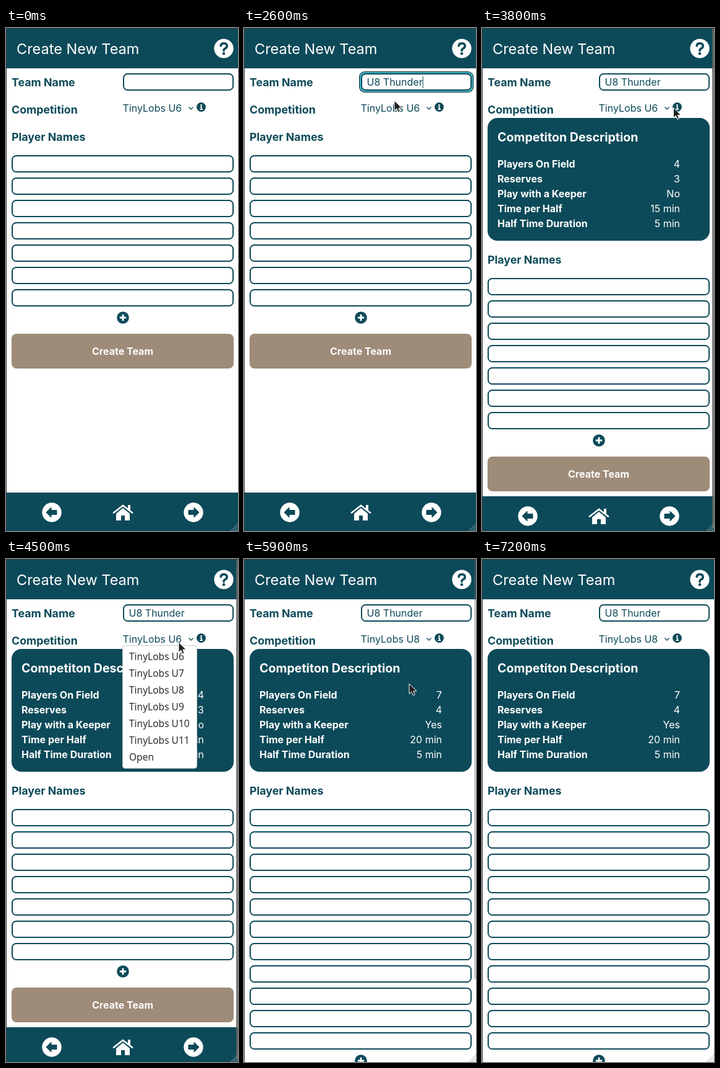
Animation, 375 px wide and 811 px high, one loop 8000 ms. Source, as an HTML page:

```html
<!DOCTYPE html>
<html lang="en">
<head>
<meta charset="utf-8">
<title>Create New Team</title>
<style>
  html, body { margin: 0; width: 100%; height: 100%; overflow: hidden; background: #fff; }
  svg { display: block; width: 375px; height: 811px; font: 16px Inter, sans-serif; fill: #0d4a59; }
  .bold { font-weight: 700; }
  .label { font-weight: 700; font-size: 17.8px; }
  .white { fill: #fff; }
  .field { fill: #fff; stroke: #0d4a59; stroke-width: 2; }
  .line { fill: none; stroke: #0d4a59; }
  .menu text { font: 15.5px "Noto Sans", sans-serif; fill: #2b2f33; }
</style>
</head>
<body>
<svg id="stage" viewBox="0 0 375 811"></svg>
<script>
const LOOP = 8000;
const STEP = 100;
const LEAGUE = "TinyLobs";
const OPTIONS = [6, 7, 8, 9, 10, 11].map(n => `${LEAGUE} U${n}`).concat("Open");
const FACTS = ["Players On Field", "Reserves", "Play with a Keeper", "Time per Half", "Half Time Duration"];
const VALUES = {
  U6: ["4", "3", "No", "15 min", "5 min"],
  U8: ["7", "4", "Yes", "20 min", "5 min"]
};

// Event times in ms
const FOCUS = 2000, TYPE = 2500, INFO = 3700, OPEN = 4500, CHOOSE = 5600;

// Pointer path: time, x, y
const PATH = [
  [1200, 2, 222], [1400, 112, 146], [1600, 196, 98], [1800, 230, 79], [1900, 230, 79],
  [2300, 240, 109], [2400, 240, 109], [2500, 243, 117], [2700, 243, 117],
  [3100, 304, 132], [3300, 316, 135], [3500, 317, 127], [3700, 317, 127],
  [4200, 279, 134], [4800, 279, 134], [5300, 267, 201], [5900, 267, 201], [6200, 378, 188]
];

// Scrollbar opacity from each time on
const SCROLL = [[0, 0], [INFO, .85], [5500, .75], [CHOOSE, .34], [6800, .28], [7000, .18], [7100, .08], [7200, 0]];

const text = (x, y, content, attrs = "") => `<text x="${x}" y="${y}" ${attrs}>${content}</text>`;
const rect = (x, y, w, h, r, attrs = "") => `<rect x="${x}" y="${y}" width="${w}" height="${h}" rx="${r}" ${attrs}/>`;
const circle = (x, y, r, attrs = "") => `<circle cx="${x}" cy="${y}" r="${r}" ${attrs}/>`;
const path = (d, attrs = "") => `<path d="${d}" ${attrs}/>`;
const group = (x, y, content, attrs = "") => `<g transform="translate(${x} ${y})" ${attrs}>${content}</g>`;
const range = n => [...Array(n).keys()];

function pointerAt(t) {
  const next = PATH.findIndex(key => key[0] >= t);
  if (t < PATH[0][0] || next < 0) return null;
  if (next === 0) return PATH[0].slice(1);
  const [t0, x0, y0] = PATH[next - 1], [t1, x1, y1] = PATH[next];
  const k = (t - t0) / (t1 - t0);
  return [x0 + (x1 - x0) * k, y0 + (y1 - y0) * k];
}

function header() {
  const hook = "M347.2 28.6Q347.6 24.8 352 24.8Q357.4 24.8 357.2 29Q357 31.6 354.2 33Q352 34.1 352 36.4";
  return rect(0, 0, 375, 65, 0) +
    text(17, 42, "Create New Team", 'class="white" font-size="23.5"') +
    circle(352, 33, 15.6, 'class="white"') +
    path(hook, 'class="line" stroke-width="3.6" stroke-linecap="round"') +
    circle(352, 41.2, 2.3);
}

function teamName(t) {
  const focused = t >= FOCUS && t < INFO;
  const value = t < TYPE ? "" : t < TYPE + STEP ? "U8 Th" : "U8 Thunder";
  const ring = rect(186, 70, 185, 34, 9, 'fill="#08272f"') + rect(187, 71, 183, 32, 8, 'fill="#44b5c4"');
  const caret = '<tspan dx="0.5" font-weight="300" id="caret"></tspan>';
  return text(9, 94, "Team Name", 'class="label"') +
    (focused ? ring : "") +
    rect(190, 74, 177, 26, 6.5, 'class="field"') +
    text(198.5, 93, value + (focused ? caret : ""), 'id="team"');
}

function competition(age) {
  const info = circle(315.5, 127.5, 7.4) +
    circle(315.5, 124.2, 1.3, 'class="white"') +
    path("M313.7 127.1H316V131.1M313.3 131.1H318", 'fill="none" stroke="#fff" stroke-width="1.6"');
  return text(9, 138, "Competition", 'class="label"') +
    text(188.5, 135, `${LEAGUE} ${age}`) +
    path("M295.5 127.6L299 131L302.5 127.6", 'class="line" stroke-width="1.4"') + info;
}

function description(age) {
  const facts = FACTS.map((fact, i) =>
    text(25, 225 + 24 * i, fact, 'class="bold"') +
    text(320, 225 + 24 * i, VALUES[age][i], 'text-anchor="end"')).join("");
  return rect(9, 145, 359, 198, 16) +
    `<g class="white">${text(25, 183, "Competiton Description", 'class="bold" font-size="19.6"')}${facts}</g>`;
}

function players(count) {
  const rows = range(count).map(i => rect(10, 206 + 36 * i, 357, 26, 6.5, 'class="field"')).join("");
  const plus = circle(189, 0, 9.8) + path("M183.8 0H194.2M189 -5.2V5.2", 'stroke="#fff" stroke-width="2.8"');
  const button = rect(9, 26, 359, 56, 8, 'fill="#9e8b78"') +
    text(188.5, 60, "Create Team", 'class="bold white" text-anchor="middle"');
  return text(9, 182, "Player Names", 'class="label"') + rows + group(0, 215 + 36 * count, plus + button);
}

function footer(y) {
  const arrow = path("M-9 0L-1 -8V-3.5H8V3.5H-1V8Z", 'stroke="#0d4a59" stroke-linejoin="round"');
  const disc = circle(0, 0, 15.7, 'class="white"');
  const home = path("M-15 .5L0 -11L15 .5", 'fill="none" stroke="#fff" stroke-width="2.8" stroke-linecap="round"') +
    path("M8 -12H12V-3L8 -6ZM-11 2L0 -7L11 2V13H3V5H-3V13H-11Z", 'class="white"');
  return group(0, y, rect(0, 0, 375, 80, 0) +
    group(74, 32, disc + arrow) +
    group(189, 32, home) +
    group(303, 32, disc + `<g transform="scale(-1 1)">${arrow}</g>`));
}

function menu(pointer) {
  const hovered = Math.floor((pointer[1] - 144) / 27);
  const items = OPTIONS.map((name, i) =>
    (i === hovered ? rect(193, 144 + 27 * i, 111, 27, 3, 'fill="#44b5c4"') : "") +
    text(199, 163 + 27 * i, name)).join("");
  return `<g class="menu">${rect(188.5, 139.5, 120, 198, 4, 'fill="#fff" stroke="#c8cccd"')}${items}</g>`;
}

function cursor([x, y]) {
  const overField = x > 189 && x < 368 && y > 73 && y < 101;
  if (overField) {
    const beam = "M-2.5 -6H-.8L0 -5.2L.8 -6H2.5M0 -5.2V5.2M-2.5 6H-.8L0 5.2L.8 6H2.5";
    return group(x, y, path(beam, 'fill="none" stroke="#fff" stroke-width="3"') +
      path(beam, 'fill="none" stroke="#111" stroke-width="1.1"'));
  }
  return group(x, y, path("M0 0V16.5L3.9 13L6.4 18.8L9.2 17.6L6.8 12H12Z", 'fill="#222" stroke="#fff"'));
}

function frameEdges(t, tall) {
  const opacity = SCROLL.filter(([start]) => start <= t).pop()[1];
  return rect(372, 1, 3, tall ? 677 : 806, 1.5, `fill="#666" opacity="${opacity}"`) +
    path("M363.5 811L375 799.5M367.5 811L375 803.5M371.5 811L375 807.5", 'stroke="#a3a7a8" stroke-width="1"') +
    path("M.5 811V.5H375", 'fill="none" stroke="#30383b"');
}

function scene(t) {
  const chosen = t >= CHOOSE, expanded = t >= INFO;
  const age = chosen ? "U8" : "U6", count = chosen ? 11 : 7;
  const shift = expanded ? 198 : 0;
  const pointer = pointerAt(t);
  return header() + teamName(t) + competition(age) +
    (expanded ? description(age) : "") +
    group(0, shift, players(count)) +
    footer(Math.max(749, 305 + 36 * count + shift)) +
    (t >= OPEN && t < CHOOSE ? menu(pointer) : "") +
    frameEdges(t, chosen) +
    (pointer ? cursor(pointer) : "");
}

function addCaret() {
  if (!document.getElementById("caret")) return;
  const team = document.getElementById("team");
  const x = 198.5 + team.getComputedTextLength() + .5;
  team.insertAdjacentHTML("afterend", path(`M${x} 78V97`, 'class="line" stroke-width="1"'));
}

const stage = document.getElementById("stage");
let shown = -1;
function tick() {
  const t = Math.floor(performance.now() % LOOP / STEP) * STEP;
  if (t !== shown) {
    stage.innerHTML = scene(t);
    addCaret();
    shown = t;
  }
  requestAnimationFrame(tick);
}
tick();
</script>
</body>
</html>
```
